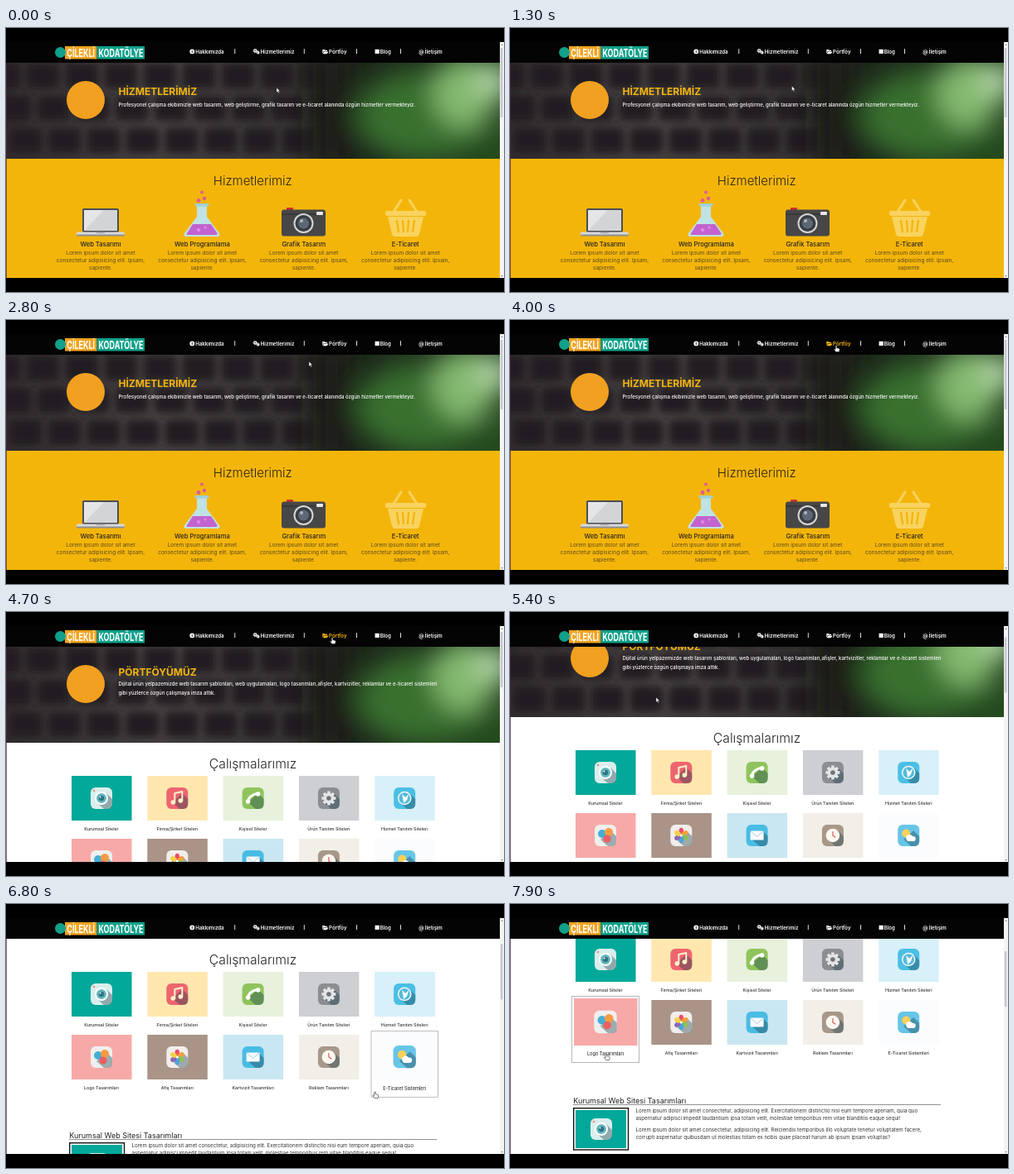
These frames come from a looping animation (600 px wide and 319 px high, 8000 ms). An HTML page:

```html
<!DOCTYPE html>
<html lang="tr">
<head>
<meta charset="utf-8">
<style>
  html, body { margin: 0; width: 100%; height: 100%; overflow: hidden; background: #000; }
  svg { display: block; width: 100vw; height: 100vh; }
  text { font-family: Inter, "Open Sans", sans-serif; }
</style>
</head>
<body>
<svg id="stage" viewBox="0 0 600 319"></svg>
<script>
const LOOP = 8000, PAGE_SWITCH = 4600;
const YELLOW = '#f4b50b', TEAL = '#02a89a';
const stage = document.getElementById('stage');

const text = (x, y, size, fill, str, more = '') =>
  `<text x="${x}" y="${y}" font-size="${size}" fill="${fill}" ${more}>${str}</text>`;
const rect = (x, y, w, h, fill, more = '') =>
  `<rect x="${x}" y="${y}" width="${w}" height="${h}" fill="${fill}" ${more}/>`;
const circle = (x, y, r, fill, more = '') =>
  `<circle cx="${x}" cy="${y}" r="${r}" fill="${fill}" ${more}/>`;
const path = (d, fill, more = '') => `<path d="${d}" fill="${fill}" ${more}/>`;
const line = (d, color, width) =>
  path(d, 'none', `stroke="${color}" stroke-width="${width}" stroke-linecap="round" stroke-linejoin="round"`);
const at = (x, y, body, more = '') => `<g transform="translate(${x} ${y})" ${more}>${body}</g>`;
const MID = 'text-anchor="middle"';
const ring = (n, draw) => Array.from({ length: n }, (_, i) => draw(i * 360 / n, i)).join('');

const defs = `<defs>
  <clipPath id="view"><rect y="42" width="595" height="260"/></clipPath>
  <clipPath id="heroBox"><rect y="42" width="595" height="116"/></clipPath>
  <filter id="soft" x="-20%" y="-20%" width="140%" height="140%"><feGaussianBlur stdDeviation="4"/></filter>
  <filter id="softer" x="-50%" y="-50%" width="200%" height="200%"><feGaussianBlur stdDeviation="15"/></filter>
  <linearGradient id="desk"><stop offset="0" stop-color="#312d2e"/><stop offset=".3" stop-color="#454140"/>
    <stop offset=".58" stop-color="#373534"/><stop offset=".7" stop-color="#1b251a"/><stop offset="1" stop-color="#284823"/></linearGradient>
</defs>`;

function heroPhoto() {
  let keys = '';
  for (let row = 0; row < 3; row++)
    for (let col = 0; col < 9; col++)
      keys += rect(-22 + col * 47 + row * 13, 43 + row * 39, 39, 30, '#211f20', 'rx="5"');
  const leaf = `<ellipse cx="500" cy="106" rx="78" ry="52" fill="#376f2d"/>` +
    `<ellipse cx="552" cy="78" rx="38" ry="42" fill="#83b970"/>` +
    circle(588, 64, 20, '#bbdcae') + `<ellipse cx="590" cy="148" rx="48" ry="18" fill="#234c1e"/>`;
  return `<g clip-path="url(#heroBox)">${rect(0, 42, 595, 116, 'url(#desk)')}
    <g filter="url(#soft)">${keys}</g>
    <g filter="url(#softer)">${rect(370, 30, 45, 140, '#1b1d19')}${leaf}</g></g>`;
}

function hero(title, titleY, lines, lineY) {
  return heroPhoto() + circle(96, 87, 23, '#f2a01f') +
    text(135.5, titleY, 12, YELLOW, title, 'font-weight="700"') +
    lines.map((s, i) => text(135.5, lineY + i * 11.3, 5.98, '#fff', s, 'font-weight="500"')).join('');
}

const laptop = rect(92, 218, 44, 29, '#4b4d52', 'rx="2"') + rect(94, 220, 40, 25, '#e4e5e7') +
  path('M94 245 L118 220 H134 V245Z', '#d2d4d6') + rect(85, 246.5, 58, 4.5, '#d8d9dc', 'rx="2"') +
  rect(85, 249.5, 58, 2, '#8e8f93', 'rx="1"') + rect(109, 246.5, 10, 1.6, '#a0a1a5');
const flask = circle(236, 198.5, 2, '#de5c93') + circle(239, 206, 2.2, '#de5c93') + circle(232, 208.5, 2.4, '#de5c93') +
  path('M230 214 H242 V228 L257 248 Q259 252 254 252 H218 Q213 252 215 248 L230 228Z', '#bfe2e4') +
  path('M225 237 H247 L254.5 248 Q255 250 253 250 H219 Q217 250 218 248Z', '#c263cf') +
  circle(232, 244, 2, '#dd8fe3') + circle(240, 241, 1.5, '#dd8fe3') + rect(227.5, 212, 17, 3.5, '#a2cfd4', 'rx="1.5"');
const camera = rect(338, 217, 8, 4, '#d22d2f', 'rx="1"') + rect(332, 219.5, 53, 32, '#474747', 'rx="3"') +
  rect(332, 224, 53, 2, '#383838') + rect(374, 222, 8, 4, '#e6e6e6', 'rx="1"') +
  circle(358.5, 236, 12, '#d6d6d6') + circle(358.5, 236, 10, '#393d43') + circle(358.5, 236, 6.5, '#5c6875') +
  circle(356, 233, 2, '#aab6c1');
const basket = line('M467 222 L476 208 M495 222 L486 208', '#f9d35f', 3) +
  rect(457, 221, 49, 6, '#f9d35f', 'rx="2"') +
  path('M460 228 H503 L498 249 Q497 252 494 252 H469 Q466 252 465 249Z', '#f9d35f') +
  line('M471 233 L473 246 M478 233 L479 246 M485 233 L484 246 M492 233 L490 246', YELLOW, 2.3);

const services = ['Web Tasarımı', 'Web Programlama', 'Grafik Tasarım', 'E-Ticaret'].map((name, i) => {
  const x = 114 + i * 122.4;
  const copy = ['Lorem ipsum dolor sit amet', 'consectetur adipisicing elit. Ipsam,', 'sapiente.'];
  return text(x, 263.5, 7.6, '#222', name, MID + ' font-weight="500"') +
    copy.map((s, j) => text(x, 274.4 + j * 8.9, 6.5, '#5b4a1c', s, MID)).join('');
}).join('');

const servicePage = rect(0, 158, 595, 145, YELLOW) +
  hero('HİZMETLERİMİZ', 81, ['Profesyonel çalışma ekibimizle web tasarım, web geliştirme, grafik tasarım ve e-ticaret alanında özgün hizmetler vermekteyiz.'], 94.8) +
  text(297.3, 189.5, 15, '#2b2418', 'Hizmetlerimiz', MID + ' font-weight="300"') +
  laptop + flask + camera + basket + services;

const clockHands = line('M0 -4.5 V0 L3 2', '#e0584f', 1.2);
const petals = ['#e94f64', '#f6a03c', '#8dc153', '#4aa5dc', '#8d67b5', '#f2d24b'];
const gallery = [
  ['Kurumsal Siteler', TEAL, '#d9eeec', circle(0, 0, 8, '#fff') + circle(0, 0, 6, '#63b9be') + circle(0, 0, 3.3, '#2e7482') + circle(-1.5, -1.5, 1, '#fff') + circle(-9, -9, 1.3, '#f28a83')],
  ['Firma/Şirket Siteleri', '#ffe7ae', '#ee6570', line('M-3 5 V-6 L6 -8 V3', '#fff0c9', 2) + circle(-5, 5, 2.8, '#fff0c9') + circle(4, 3, 2.8, '#fff0c9')],
  ['Kişisel Siteler', '#e7f1dc', '#8fc45c', line('M-6 4 Q-6 -3 6 -6', '#fff', 3) + circle(-6, 4, 2.8, '#fff') + circle(6, -5, 2.8, '#fff')],
  ['Ürün Tanıtım Siteleri', '#cecfd3', '#8b8d91', ring(8, a => rect(-1.8, -8.5, 3.6, 5, '#e4e5e6', `transform="rotate(${a})"`)) + circle(0, 0, 6.3, '#e4e5e6') + circle(0, 0, 2.8, '#707276')],
  ['Hizmet Tanıtım Siteleri', '#d7f0f9', '#4bbfe4', circle(0, 0, 8.3, '#f2fafb') + circle(0, 0, 6.8, '#55b9dc') + path('M-1 6 L-3 -5 L1 -1 L5 -5 L3 2Z', '#fff')],
  ['Logo Tasarımları', '#f7a9a7', '#eef0ed', circle(-4, -2, 5, '#45aed5') + circle(4, -4, 5, '#f59b43') + circle(2, 4, 4.5, '#ee5d60')],
  ['Afiş Tasarımları', '#a99487', '#f1eeeb', ring(6, (a, i) => `<ellipse cx="0" cy="-5" rx="2.8" ry="4.2" fill="${petals[i]}" transform="rotate(${a})"/>`) + circle(0, 0, 1.5, '#fff')],
  ['Kartvizit Tasarımları', '#c9e7f2', '#49bce4', rect(-8, -5.5, 16, 11, '#f8fbfc', 'rx="1"') + line('M-7.5 -5 L0 1.5 L7.5 -5', '#a8cbd8', 1)],
  ['Reklam Tasarımları', '#f2efe8', '#a8988a', circle(0, 0, 8.3, '#fdf8f0') + clockHands],
  ['E-Ticaret Sistemleri', '#fbfcfd', '#67c5e8', circle(-3, -2.5, 5, '#fbd05a') + circle(1, 3, 4, '#fff') + circle(5.5, 4, 3, '#fff') + rect(-2, 3, 9, 4, '#fff', 'rx="2"')],
];
const appIcon = (color, glyph) => rect(-13, -13, 26, 26, color, 'rx="6"') +
  path('M6 -6 L13 1 V7 Q13 13 7 13 H3 L-6 5Z', '#173c4a', 'opacity=".38"') + glyph;

const tiles = gallery.map(([name, back, color, glyph], i) => {
  const x = 79 + (i % 5) * 91.3, y = i < 5 ? 198 : 274;
  return { x, y, svg: `<g class="tile"><rect class="frame" x="-2.3" y="-2.5" width="76.6" height="76" fill="#fff" stroke="#a9a9ac" stroke-width=".8" opacity="0"/>` +
    rect(0, 0, 72.5, 54, back) + at(36, 27, appIcon(color, glyph)) +
    text(36, 65.6, 5.3, '#333', name, MID + ' font-weight="500"') + '</g>' };
});

const paragraph = [
  [410.3, 'Lorem ipsum dolor sit amet consectetur, adipisicing elit. Exercitationem distinctio nisi eum tempore aperiam, quia quo'],
  [418.8, 'aspernatur adipisci impedit laudantium ipsa totam velit, molestiae temporibus rem vitae blanditiis eaque sequi!'],
  [433, 'Lorem ipsum dolor sit amet consectetur, adipisicing elit. Reiciendis temporibus illo voluptate tenetur voluptatem facere,'],
  [442, 'corrupti aspernatur quibusdam ut molestias totam ex nobis quae placeat harum ab ipsum ipsam voluptas?'],
].map(([y, s]) => text(151.5, y, 6.15, '#333', s)).join('');

const portfolioPage = rect(0, 158, 595, 400, '#fff') +
  hero('PÖRTFÖYÜMÜZ', 77, [
    'Dijital ürün yelpazemizde web tasarım şablonları, web uygulamaları, logo tasarımları,afişler, kartvizitler, reklamlar ve e-ticaret sistemleri',
    'gibi yüzlerce özgün çalışmaya imza attık.'], 88.8) +
  text(297.5, 189.3, 15.7, '#222', 'Çalışmalarımız', MID + ' font-weight="300"') +
  tiles.map(t => t.svg).join('') +
  text(76.3, 398.8, 9, '#222', 'Kurumsal Web Sitesi Tasarımları') + rect(76, 400, 443, .8, '#777') +
  rect(76.7, 404.7, 65.8, 50.3, '#fff', 'stroke="#111" stroke-width="1.4"') +
  rect(79, 407, 61, 46, TEAL) + at(110, 430, appIcon(gallery[0][2], gallery[0][3])) + paragraph;

const cog = (x, y, r) => circle(x, y, r, 'none', 'stroke="#fff" stroke-width="1.3"') +
  circle(x, y, r + 1, 'none', 'stroke="#fff" stroke-width=".7" stroke-dasharray=".9 .9"');
const navText = (x, s) => text(x, 30.6, 6.1, 'currentColor', s, 'font-weight="600"');
const header = rect(0, 17, 595, 25, '#040404') +
  rect(71, 22, 38.5, 15.5, '#f2a31f') + rect(109.5, 22, 57.5, 15.5, '#10a08b') + circle(65.5, 29.5, 6.5, '#10a08b') +
  `<g font-weight="700" transform="translate(0 34.8) scale(1 1.5)">${text(73.3, 0, 9, '#fff', 'ÇİLEKLİ')}${text(111.5, 0, 9, '#fff', 'KODATÖLYE')}</g>` +
  `<g color="#fff">${circle(224.3, 28.4, 2.9, '#fff')}${text(224.3, 30.3, 5, '#000', 'i', MID + ' font-weight="800"')}
    ${navText(228.3, 'Hakkımızda')}${cog(300.2, 27.6, 1.4)}${cog(303.7, 29.6, .9)}${navText(306.8, 'Hizmetlerimiz')}
    ${rect(444.6, 25.8, 5.2, 5.2, '#fff')}${navText(450.7, 'Blog')}${text(497.3, 30.6, 6.4, '#fff', '@', 'font-weight="600"')}${navText(504.8, 'İletişim')}</g>` +
  `<g id="portfolioLink">${path('M381.3 26 H383.6 L384.4 26.8 H387 V28 H383 L381.3 30.8Z M383.3 28.5 H388.3 L386.8 31.3 H381.6Z', 'currentColor')}${navText(389, 'Pörtföy')}</g>` +
  [275.2, 358.8, 422, 475].map(x => rect(x, 25.2, 1, 6, '#ddd')).join('');

const scrollbar = rect(595, 17, 5, 285, '#f4f4f6') + `<rect id="thumb" x="595.8" width="2.6" fill="#c6c8cf"/>` +
  path('M596.6 21 L597.6 19.5 L598.6 21Z M596.6 299 L597.6 300.5 L598.6 299Z', '#555');
const pointers = `<g id="arrow">${path('M0 0 V6 L1.4 4.8 L2.4 7 L3.4 6.5 L2.4 4.4 H4.2Z', '#fff', 'stroke="#222" stroke-width=".5"')}</g>` +
  `<g id="hand">${path('M-.8 .3 Q0 -.6 .8 .3 V2.8 L3.6 3.4 Q4.4 3.7 4.2 4.8 L3.6 7.6 H-.4 L-2.7 4.4 Q-2.4 3.5 -.8 4.6Z', '#fff', 'stroke="#222" stroke-width=".6"')}</g>`;

stage.innerHTML = defs + rect(0, 0, 600, 319, '#000') +
  `<g clip-path="url(#view)"><g id="services">${servicePage}</g><g id="portfolio">${portfolioPage}</g></g>` +
  rect(0, 17, .7, 285, '#5c1f35') + header + scrollbar + pointers;

const $ = id => document.getElementById(id);
const tileNodes = [...stage.querySelectorAll('.tile')];
const frameNodes = [...stage.querySelectorAll('.frame')];

const cursorKeys = [[0, 326, 72], [1300, 339.5, 70], [2100, 342, 69], [2800, 365, 50], [3600, 392, 31],
  [4000, 393, 31], [4700, 393, 31], [5250, 176, 103], [5500, 176, 103], [6400, 482, 122], [6800, 444.5, 227],
  [7200, 330, 205], [7700, 116, 181], [8000, 116, 181]];
const scrollKeys = [[0, 0], [5200, 0], [5400, 31], [5850, 116], [7100, 116], [7450, 158], [8000, 158]];

function sample(keys, t) {
  if (t <= keys[0][0]) return keys[0].slice(1);
  const i = Math.max(1, keys.findIndex(k => k[0] >= t));
  const [a, b] = [keys[i - 1], keys[i]];
  const u = (t - a[0]) / (b[0] - a[0]), e = u * u * (3 - 2 * u);
  return a.slice(1).map((v, j) => v + (b[j + 1] - v) * e);
}

function overLink(t) {
  const [x, y] = sample(cursorKeys, t);
  return x > 380 && x < 411 && y > 23 && y < 35;
}
function overTile(tile, t) {
  if (t < PAGE_SWITCH) return false;
  const [x, y] = sample(cursorKeys, t), [scroll] = sample(scrollKeys, t);
  const dx = x - tile.x, dy = y + scroll - tile.y;
  return y > 42 && dx > -3 && dx < 75 && dy > -3 && dy < 74;
}
// Averaging the recent past gives each hover its fade in and out.
function fade(isOver, t) {
  let sum = 0;
  for (let k = 0; k < 10; k++) sum += isOver(t - k * 30) ? 1 : 0;
  return sum / 10;
}

function render(t) {
  const onPortfolio = t >= PAGE_SWITCH;
  const [x, y] = sample(cursorKeys, t), [scroll] = sample(scrollKeys, t);
  $('services').style.display = onPortfolio ? 'none' : '';
  $('portfolio').style.display = onPortfolio ? '' : 'none';
  $('portfolio').setAttribute('transform', `translate(0 ${-scroll})`);

  let pointing = overLink(t);
  tiles.forEach((tile, i) => {
    const level = fade(s => overTile(tile, s), t), scale = 1 + .055 * level;
    tileNodes[i].setAttribute('transform', `translate(${tile.x + 36} ${tile.y + 36}) scale(${scale}) translate(-36 -36)`);
    frameNodes[i].setAttribute('opacity', level);
    pointing = pointing || overTile(tile, t);
  });

  const glow = fade(overLink, t);
  $('portfolioLink').setAttribute('color', `rgb(${255 - 11 * glow},${255 - 74 * glow},${255 - 244 * glow})`);
  $('thumb').setAttribute('y', 24 + scroll * .21);
  $('thumb').setAttribute('height', onPortfolio ? 67 : 84);
  for (const id of ['arrow', 'hand']) {
    $(id).setAttribute('transform', `translate(${x} ${y})`);
    $(id).style.display = (id === 'hand') === pointing ? '' : 'none';
  }
}

const start = performance.now();
function tick() {
  render((performance.now() - start) % LOOP);
  requestAnimationFrame(tick);
}
tick();
</script>
</body>
</html>
```
